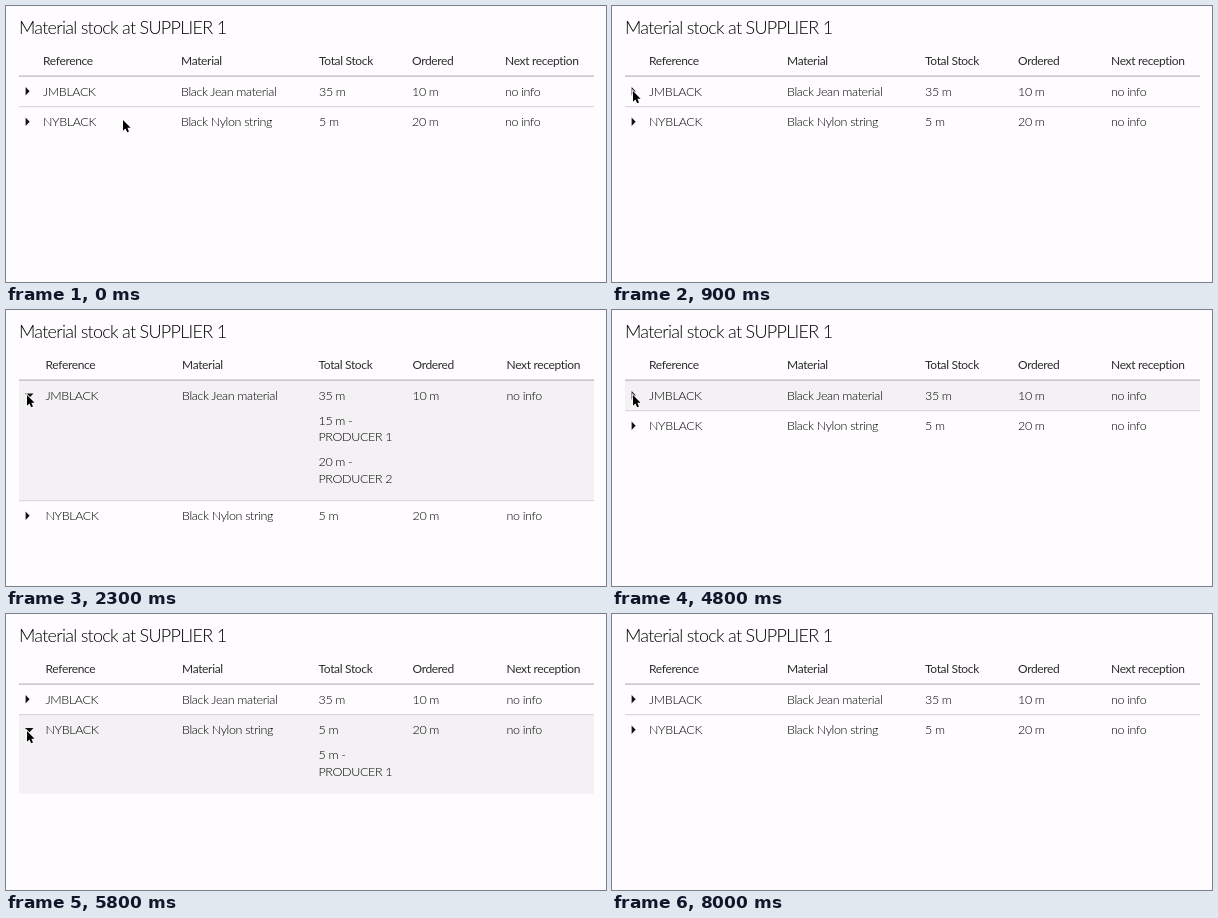
Recreate the animation shown at these times as an HTML page. Size 600 by 276 pixels, loop 10000 ms.

```html
<!DOCTYPE html>
<html lang="en">
<head>
<meta charset="utf-8">
<title>Material stock</title>
<style>
html, body { margin: 0; width: 100%; height: 100%; overflow: hidden; background: #fefcfe; }
svg { display: block; width: 600px; height: 276px; }
text { font: 300 12.5px Lato, sans-serif; letter-spacing: -0.028em; fill: #000; white-space: pre; }
.title { font-size: 18px; letter-spacing: -0.04em; }
.head { font-weight: 400; font-size: 12px; fill: #2c2c2c; }
</style>
</head>
<body>
<svg id="stage" viewBox="0 0 600 276"></svg>
<script>
const stage = document.getElementById('stage');
const LOOP = 10000, STEP = 100;
const HEAD = ['Reference', 'Material', 'Total Stock', 'Ordered', 'Next reception'];
const ROWS = [
  { cells: ['JMBLACK', 'Black Jean material', '35 m', '10 m', 'no info'],
    stock: ['15 m -', '20 m -'], opens: 2200, closes: 4800 },
  { cells: ['NYBLACK', 'Black Nylon string', '5 m', '20 m', 'no info'],
    stock: ['5 m -'], opens: 5800, closes: 7600 },
];
const HOVER_FROM = ROWS[0].opens;
const MOVES = [
  { from: 0, to: 300, x: 59, y: 105 },
  { from: 400, to: 700, x: 14, y: 89 },
  { from: 700, to: 900, x: 21, y: 85 },
  { from: 5000, to: 5600, x: 21, y: 117 },
  { from: 7700, to: 8000, x: 90, y: 300 },
];

const isOpen = (row, t) => t >= row.opens && t < row.closes;
const text = (x, y, s, cls = '') => `<text x="${x}" y="${y}" class="${cls}">${s}</text>`;
const rect = (y, h, fill) => `<rect x="13" y="${y}" width="575" height="${h}" fill="${fill}"/>`;
const shape = (x, y, d) => `<path transform="translate(${x} ${y})" d="${d}" fill="#111"/>`;

// Two wide columns, then narrow ones; opening a row shifts them slightly
function columnX(i, open) {
  const [start, wide, narrow] = open ? [39.5, 136.5, 94] : [37, 138, 93];
  return start + wide * Math.min(i, 2) + narrow * Math.max(i - 2, 0);
}

function pointerAt(t) {
  let x = 117, y = 114;
  for (const move of MOVES) {
    const k = Math.min(1, Math.max(0, (t - move.from) / (move.to - move.from)));
    x += (move.x - x) * k;
    y += (move.y - y) * k;
  }
  return { x, y };
}

function render(t) {
  const pointer = pointerAt(t);
  const anyOpen = ROWS.some(row => isOpen(row, t));
  const line = (list, y, cls) => list.map((s, i) => text(columnX(i, anyOpen), y, s, cls)).join('');
  let out = text(13, 28, 'Material stock at SUPPLIER 1', 'title') + line(HEAD, 58.7, 'head');
  let y = 70;
  ROWS.forEach((row, n) => {
    const open = isOpen(row, t);
    const height = open ? 37.5 + 41.5 * row.stock.length : 30.5;
    const hovered = t >= HOVER_FROM && pointer.y >= y && pointer.y < y + height;
    if (hovered) out += rect(y, height, '#f3f1f3');
    out += rect(y - 0.5, 1.2, n ? '#dad8da' : '#b8b6b8') + line(row.cells, y + 19.7);
    out += open ? shape(19, y + 13.5, 'M0 0H8.5L4.25 4.5Z') : shape(19.6, y + 11, 'M0 0V8.6L4 4.3Z');
    if (open) row.stock.forEach((amount, i) => {
      const x = columnX(2, true), top = y + 44.7 + 41.5 * i;
      out += text(x, top, amount) + text(x, top + 16.5, `PRODUCER ${i + 1}`);
    });
    y += height;
  });
  stage.innerHTML = out + `<path transform="translate(${pointer.x} ${pointer.y})"
    d="M0 0V10.8L2.4 8.6L4.2 12.3L6 11.5L4.4 7.8H7.6Z"
    stroke="#fff" stroke-width="1.6" paint-order="stroke"/>`;
}

let shown = -1;
function tick() {
  const t = Math.floor(performance.now() % LOOP / STEP) * STEP;
  if (t !== shown) render(shown = t);
  requestAnimationFrame(tick);
}
tick();
</script>
</body>
</html>
```
